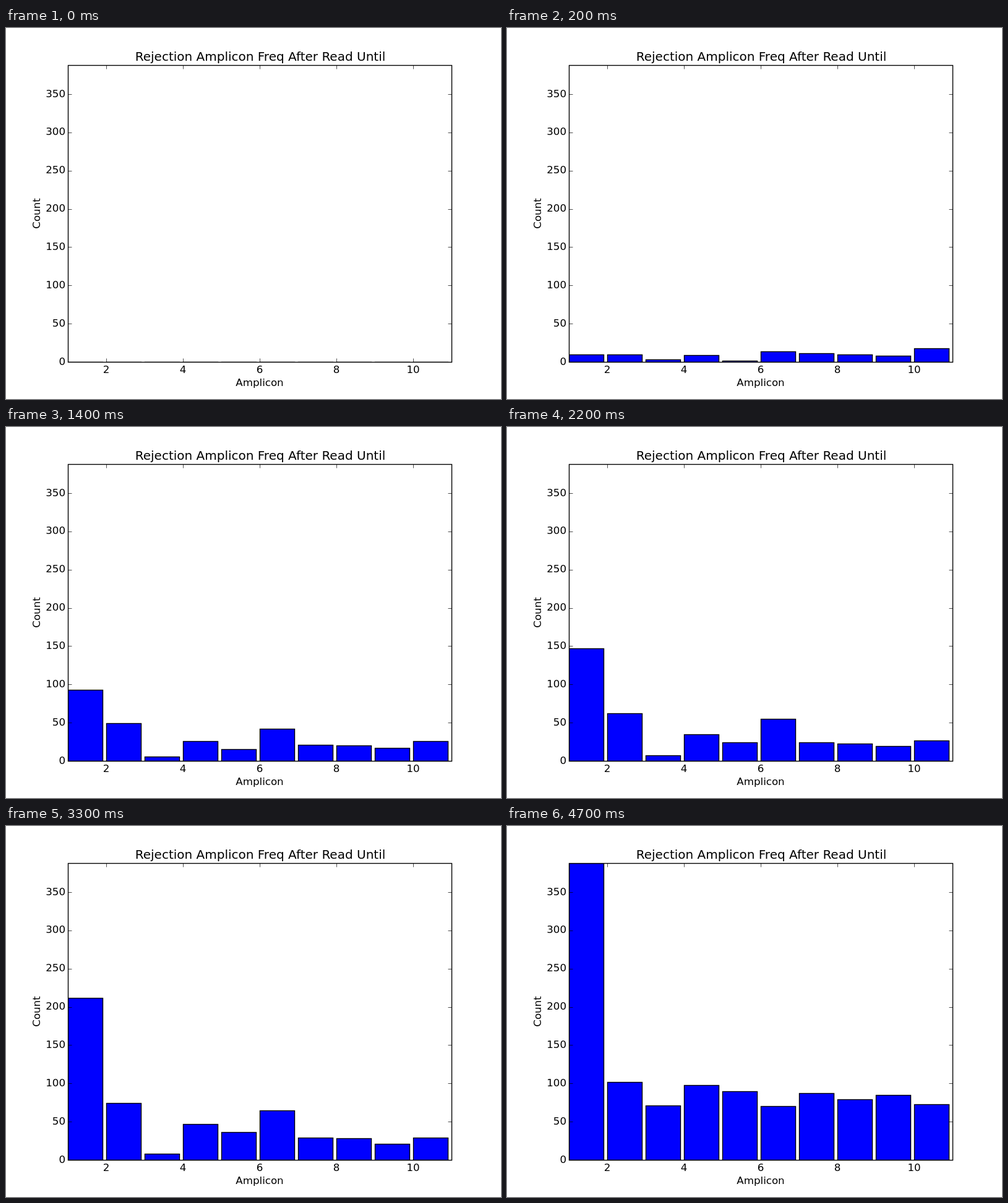
Recreate the animation shown at these times as an HTML page. Size 800x600 px, loop 4800 ms.

```html
<!DOCTYPE html>
<html lang="en">
<head>
<meta charset="utf-8">
<title>Rejection Amplicon Freq After Read Until</title>
<style>
  html, body { margin: 0; width: 100%; height: 100%; overflow: hidden; background: #fff; }
  svg { display: block; width: 800px; height: 600px; }
  text { font: 16.667px "DejaVu Sans", sans-serif; fill: #000; text-anchor: middle; }
  .title { font-size: 20px; }
  .num { text-anchor: end; }
  .bar { stroke: #000; stroke-width: 1.39; }
  .tick { stroke: #000; stroke-width: 0.69; }
  .frame { fill: none; stroke: #000; stroke-width: 1.39; }
</style>
</head>
<body>
<svg viewBox="0 0 800 600">
  <clipPath id="plot"><rect x="100" y="60" width="620" height="480"/></clipPath>
  <rect id="back" width="800" height="600"/>
  <g id="bars" clip-path="url(#plot)"></g>
  <g id="axes"></g>
  <rect class="frame" x="100.5" y="60.5" width="620" height="480"/>
  <text class="title" x="411" y="53">Rejection Amplicon Freq After Read Until</text>
  <text x="410" y="579">Amplicon</text>
  <text transform="translate(55 300) rotate(-90)">Count</text>
</svg>
<script>
const STEP = 100, STEPS = 48, MAX = 388;

// Per amplicon: counts at the four key steps, then the final total.
const TIMES = [1, 7, 22, 41];
const AMPLICONS = [
  [4, 41, 147, 253, MAX],
  [5, 35, 62, 78, 102],
  [3, 5, 7, 8, 71],
  [7, 19, 35, 56, 98],
  [1, 6, 24, 43, 90],
  [11, 28, 55, 68, 70],
  [9, 18, 24, 33, 87],
  [8, 19, 23, 33, 79],
  [6, 16, 19, 22, 85],
  [16, 26, 27, 30, 73]
];

const snap = v => Math.floor(v + 0.5) + 0.5;
const xAt = n => 100 + (n - 1) * 62;
const yAt = count => 540 - count * 480 / MAX;

// Steady start, then a parabola through the last three key counts, then a jump.
function countAt(step, [a, b, c, d, total]) {
  const [ta, tb, tc, td] = TIMES;
  if (step < ta) return 0;
  if (step === STEPS - 1) return total;
  const slope = (b - a) / (tb - ta);
  if (step <= tb) return Math.round(a + slope * (step - ta));
  const early = (c - b) / (tc - tb), late = (d - c) / (td - tc);
  const bend = (late - early) / (td - tb);
  return Math.round(b + (step - tb) * (early + bend * (step - tc)));
}

function add(parent, tag, attrs, text) {
  const el = document.createElementNS("http://www.w3.org/2000/svg", tag);
  for (const name in attrs) el.setAttribute(name, attrs[name]);
  if (text !== undefined) el.textContent = text;
  return parent.appendChild(el);
}

const back = document.getElementById("back");
const barGroup = document.getElementById("bars");
const axes = document.getElementById("axes");
const tick = d => add(axes, "path", { class: "tick", d });

for (let n = 2; n <= 10; n += 2) {
  const x = snap(xAt(n));
  tick(`M${x} 540.5v-6M${x} 60.5v6`);
  add(axes, "text", { x: xAt(n), y: 558 }, n);
}
for (let c = 0; c <= 350; c += 50) {
  const y = snap(yAt(c));
  tick(`M100.5 ${y}h6M720.5 ${y}h-6`);
  add(axes, "text", { class: "num", x: 96, y: Math.floor(yAt(c) + 5) }, c);
}

const bars = AMPLICONS.map((keys, i) => {
  const left = xAt(i + 1), x = snap(left);
  return add(barGroup, "rect", { class: "bar", x, width: snap(left + 55.8) - x });
});

function draw(step) {
  const dark = step === 1;
  back.setAttribute("fill", dark ? "#242424" : "#fff");
  barGroup.setAttribute("fill", dark ? "#151515" : "#00f");
  bars.forEach((bar, i) => {
    const top = snap(yAt(countAt(step, AMPLICONS[i])));
    bar.setAttribute("y", top);
    // A flat bar still needs its outline, so keep a sliver of height.
    bar.setAttribute("height", Math.max(0.01, 540.5 - top));
  });
}

const start = performance.now();
function loop() {
  draw(Math.floor((performance.now() - start) / STEP) % STEPS);
  requestAnimationFrame(loop);
}
loop();
</script>
</body>
</html>
```
